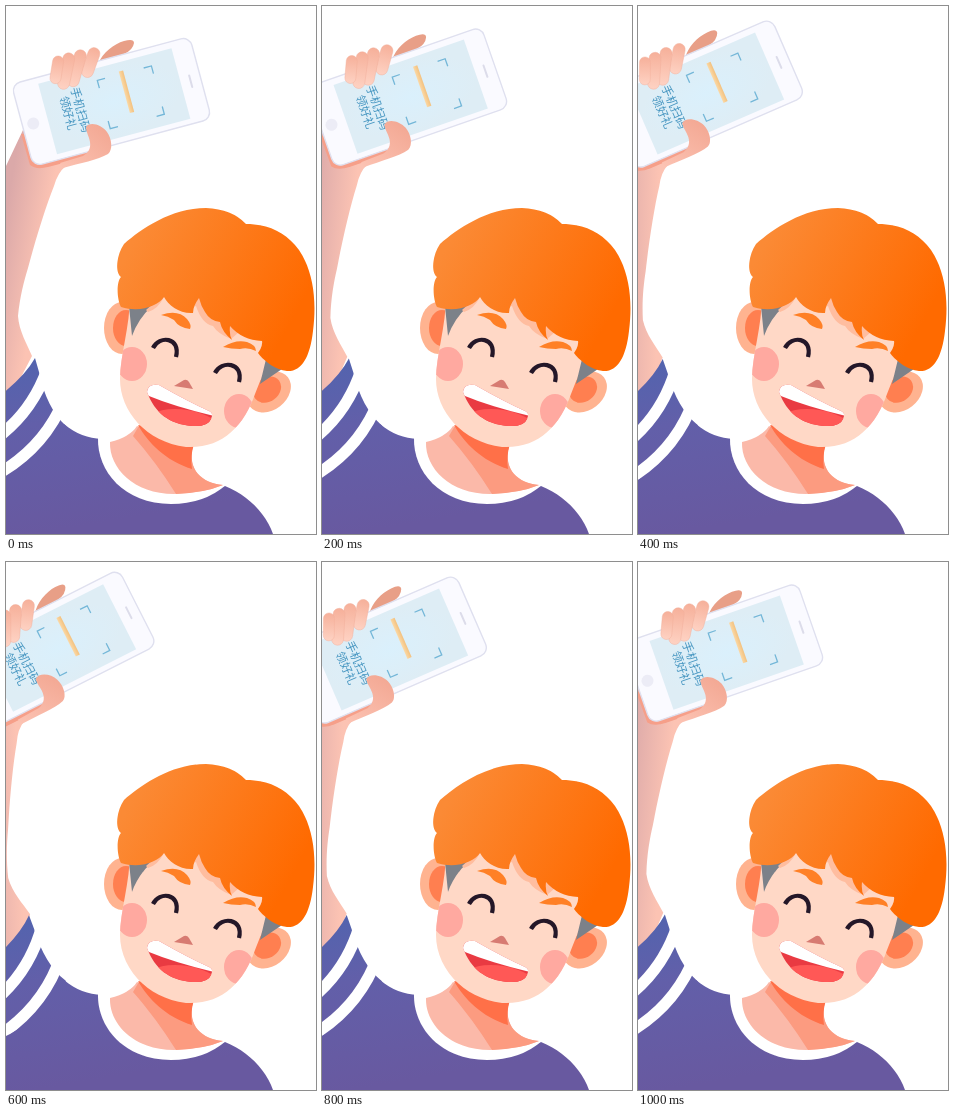
An HTML page that plays this animation: 310x528 px, repeating every 1200 ms.

```html
<!DOCTYPE html>
<html lang="zh">
<head>
<meta charset="utf-8">
<title>Waving boy with phone</title>
<style>
html, body { margin: 0; width: 100%; height: 100%; overflow: hidden; background: #fff; }
svg { display: block; width: 100%; height: 100%; }
text { font: 500 11.6px "Noto Sans CJK SC", "Noto Sans CJK", sans-serif; fill: #4595c0; text-anchor: middle; }
</style>
</head>
<body>
<svg viewBox="0 0 310 528">
  <defs>
    <linearGradient id="shirt" gradientUnits="userSpaceOnUse" x1="0" y1="350" x2="30" y2="528">
      <stop offset="0" stop-color="#5164af"/>
      <stop offset=".4" stop-color="#625fa9"/>
      <stop offset="1" stop-color="#6859a0"/>
    </linearGradient>
    <linearGradient id="skin" gradientUnits="userSpaceOnUse" x1="-8" y1="255" x2="34" y2="262">
      <stop offset="0" stop-color="#dba9a9"/>
      <stop offset="1" stop-color="#fcc3b3"/>
    </linearGradient>
    <linearGradient id="hair" gradientUnits="userSpaceOnUse" x1="125" y1="240" x2="280" y2="325">
      <stop offset="0" stop-color="#fb8a35"/>
      <stop offset="1" stop-color="#ff6a00"/>
    </linearGradient>
    <linearGradient id="finger" x1="0" y1="0" x2="0" y2="1">
      <stop offset="0" stop-color="#f6b09a"/>
      <stop offset="1" stop-color="#fed2c3"/>
    </linearGradient>
    <linearGradient id="thumb" x1="1" y1="0" x2="0" y2="1">
      <stop offset="0" stop-color="#f2a590"/>
      <stop offset="1" stop-color="#fcc3b3"/>
    </linearGradient>
    <radialGradient id="screen">
      <stop offset="0" stop-color="#daf0fc"/>
      <stop offset="1" stop-color="#deedf5"/>
    </radialGradient>
    <linearGradient id="scan">
      <stop offset="0" stop-color="#fbd9a6"/>
      <stop offset="1" stop-color="#f3c17f"/>
    </linearGradient>
    <clipPath id="faceClip"><use href="#face"/></clipPath>
    <clipPath id="mouthClip"><use href="#mouth"/></clipPath>
  </defs>

  <g id="arm">
    <path fill="url(#skin)" d="M17 124L0 160L-60 270L-40 410L0 400L26 350C21 338 13 325 12 310C14 290 18 275 22 262C30 232 40 200 48 180Q52 166 60 160L100 140L60 110Z"/>
    <path fill="#f69f89" d="M15 128L24 159Q30 164 42 161L104 145L100 130Z"/>
    <path fill="#e89f87" d="M92 58C97 46 108 38 118 35Q128 32 128 37Q127 44 118 48L106 56Z"/>
    <g transform="translate(105.5 96.5) rotate(-15)">
      <rect x="-92" y="-43.5" width="184.5" height="85" rx="9" fill="#fafaff" stroke="#dfe0ef" stroke-width="1.4"/>
      <rect x="-66" y="-37" width="138" height="73" fill="url(#screen)"/>
      <circle cx="-81" cy="0" r="6" fill="#ececf6"/>
      <path d="M82 -6V6" stroke="#dcdcea" stroke-width="2" stroke-linecap="round"/>
      <path d="M0 -25H-8V-17M40 -25H48V-17M48 17V25H40M0 25H-8V17" fill="none" stroke="#74b7d8" stroke-width="1.3"/>
      <rect x="15" y="-28" width="4.5" height="43" fill="url(#scan)"/>
      <text transform="translate(-36 -1) rotate(90)">手机扫码</text>
      <text transform="translate(-49 -1) rotate(90)">领好礼</text>
    </g>
    <g id="fingers"></g>
    <path fill="url(#thumb)" d="M80 121C84 115 96 119 101 126C106 133 107 144 102 148C92 154 74 157 57 162L54 157L77 150C82 147 85 143 84 136C83 130 80 126 80 121Z"/>
  </g>

  <g id="sleeve">
    <path fill="url(#shirt)" d="M29 352Q18 372 -12 394V500H70L60 420C47 408 38 390 33 366Z"/>
    <g fill="none" stroke="#fff" stroke-width="11.5">
      <path d="M41 364Q25 408 -12 434"/>
      <path d="M58 394Q37 444 -12 470"/>
    </g>
  </g>

  <path fill="url(#shirt)" d="M0 474C25 462 45 440 58 418C70 428 82 432 96 433L120 470L200 485L219 480C242 489 260 508 267 528H0Z"/>
  <path fill="#fff" d="M92 432C91 465 118 498 165 498Q198 498 220 479L188 440L120 428Z"/>
  <path fill="#fbb9a9" d="M131 420Q124 431 104 436C103 462 128 488 168 488Q198 487 217 479C196 477 181 464 187 440Z"/>
  <path fill="#fc9b80" d="M127 430Q150 456 170 488Q198 487 217 479C196 477 181 464 187 440L134 418Z"/>
  <path fill="#ff7048" d="M132 419C142 437 160 455 186 463Q184 450 188 438Z"/>

  <g id="head">
    <ellipse cx="116" cy="322" rx="18" ry="26" fill="#ffb390"/>
    <ellipse cx="120" cy="322" rx="13" ry="18" fill="#ff7f50"/>
    <g transform="translate(263 386) rotate(-38)">
      <ellipse rx="24" ry="18" fill="#ffb390"/>
      <ellipse cy="-3" rx="15" ry="12" fill="#ff7f50"/>
    </g>
    <path id="face" fill="#ffd8c6" d="M124 290C124 320 114 350 114 373C114 405 140 436 180 441C216 443 238 420 249 388L264 350L240 290L160 270Z"/>
    <path fill="#7c8189" d="M123 300H146Q132 313 126 330ZM261 349L276 363L254 378Z"/>
    <g clip-path="url(#faceClip)" fill="#ffa9a0">
      <ellipse cx="126" cy="358" rx="15" ry="17"/>
      <ellipse cx="233" cy="405" rx="15" ry="17"/>
    </g>
    <path fill="#ffbd9f" d="M140 304L158 288Q164 302 176 305L190 300Q196 318 207 320Q212 328 225 333L240 320L200 280L158 291Q152 303 142 306Z"/>
    <path fill="url(#hair)" d="M115 301C111 294 110 276 115 271C109 267 110 250 118 238C135 223 165 202 200 202Q226 203 240 218C262 218 280 226 293 244C307 265 311 293 307 325C304 352 295 366 281 365C268 364 256 353 252 347Q257 340 256 335Q236 334 224 320Q223 329 226 334Q216 326 214 316Q204 315 199 306Q195 300 193 292Q187 300 187 307C174 308 162 299 158 291C152 300 134 307 115 301Z"/>
    <g fill="#ff8026">
      <path d="M155 309Q172 303 181 313Q186 319 184 323Q173 322 168 314Q162 310 155 309Z"/>
      <path d="M217 341Q230 333 241 336Q250 339 250 345Q242 341 234 343Q225 343 217 341Z"/>
    </g>
    <g fill="none" stroke="#241728" stroke-width="4.2">
      <path d="M147 342C153 329 175 331 170 351"/>
      <path d="M209 367C215 354 238 356 233 376"/>
    </g>
    <path fill="#d77b72" d="M168 380L178 374Q181 373 183 376L187 383Z"/>
    <path id="mouth" fill="#e93a42" d="M141 386Q142 377 153 379Q181 395 203 405Q208 407 205 413Q202 421 186 420C163 418 149 407 141 386Z"/>
    <g clip-path="url(#mouthClip)">
      <ellipse cx="180" cy="420" rx="37" ry="16" fill="#ff5856" transform="rotate(10 180 420)"/>
      <path fill="#fff" d="M138 388Q166 400 208 410V395L150 370Z"/>
    </g>
  </g>
</svg>
<script>
const STEP = 200;
const TILT = [0, 4.2, 8.5, 11.9];
const $ = id => document.getElementById(id);

// Each finger: knuckle x, y, width, length, lean
const fingers = [[90, 42, 12, 31, 20], [76, 44, 12, 38, 16], [64, 47, 12, 37, 12], [53, 50, 11, 28, 9]];
$('fingers').innerHTML = fingers.map(([x, y, w, h, lean]) =>
  `<rect x="${-w / 2}" width="${w}" height="${h}" rx="${w / 2}" fill="url(#finger)"
    stroke="#f1ad98" stroke-width=".4" transform="translate(${x} ${y}) rotate(${lean})"/>`).join('');

function draw(time) {
  const step = Math.floor(time / STEP) % 6;
  const tilt = TILT[Math.min(step, 6 - step)];
  $('arm').setAttribute('transform', `rotate(${-tilt} 36 360)`);
  $('sleeve').setAttribute('transform', `rotate(${-tilt * 0.4} 42 425)`);
}

const start = performance.now();
function tick() {
  draw(performance.now() - start);
  requestAnimationFrame(tick);
}
tick();
</script>
</body>
</html>
```
